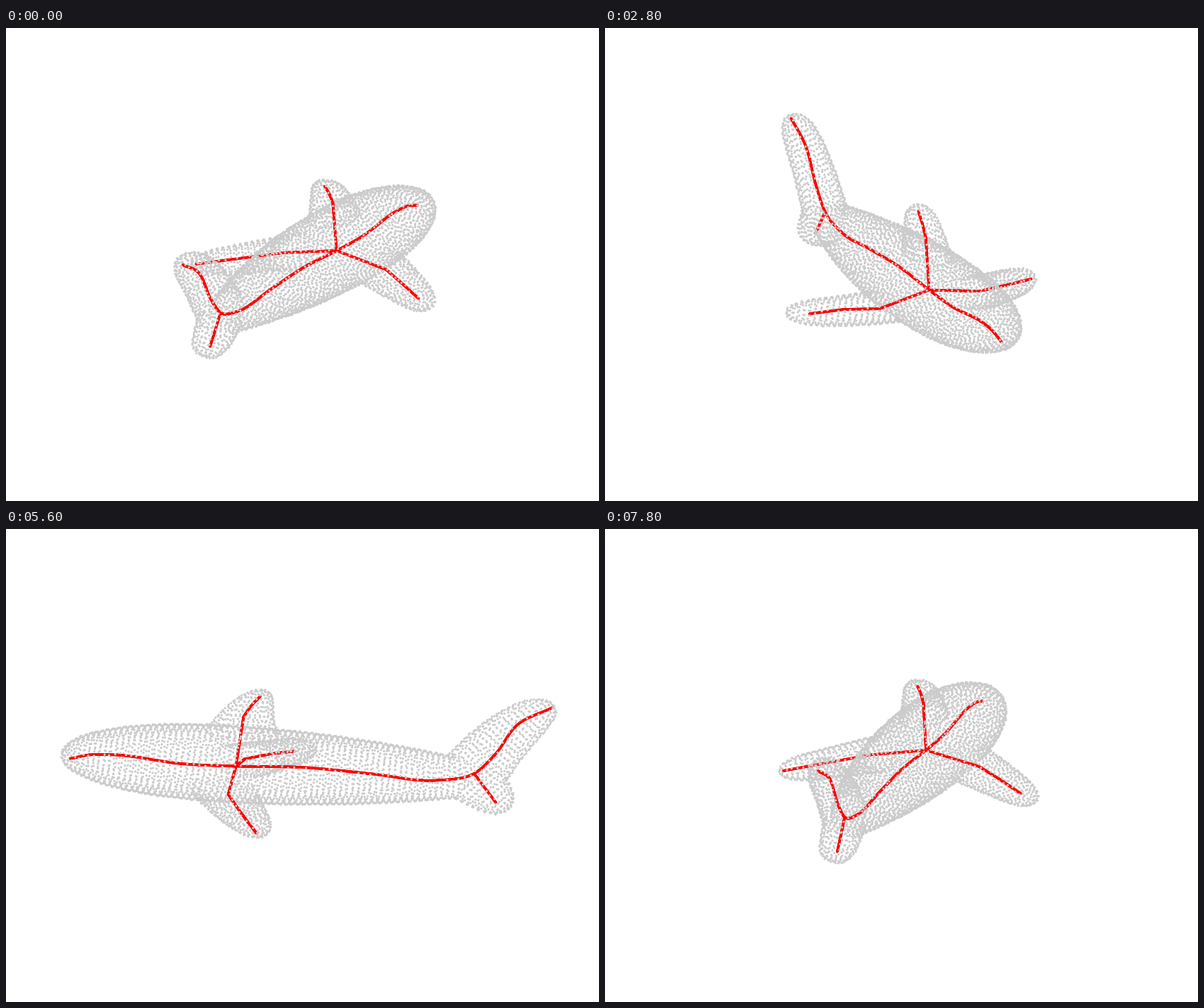
These frames come from a looping animation (837 px wide and 669 px high, 8000 ms). A matplotlib script:

```python
import numpy as np
import matplotlib.pyplot as plt
from matplotlib.animation import FuncAnimation

W, H, DPI = 837, 669, 64
FRAMES, INTERVAL = 40, 200
CX, CY = 418.5, 334.5
PHI = np.radians(61.4)       # heading of the body axis at the start
SIN_E = 0.325                # camera elevation
COS_E = np.sqrt(1 - SIN_E ** 2)
MID = -2.5                   # sideways place of the symmetry plane
GREY, RED = (0.795, 0.795, 0.795, 1), (1, 0, 0, 1)
GREY_PX, RED_PX = 3.2, 3.8
RING, ARC, JITTER = 8.4, 6.9, 0.7
SIDE, UP = (0, 1, 0), (0, 0, 1)
rng = np.random.default_rng(4)

# Coordinates: along the body, sideways, height (as screen y).


def chord(rows):
    return np.r_[0, np.cumsum(np.linalg.norm(np.diff(rows, axis=0), axis=1))]


def resample(rows, step):
    """Even steps along a polyline of any dimension."""
    rows = np.asarray(rows, float)
    dist = chord(rows)
    at = np.linspace(0, dist[-1], max(2, int(round(dist[-1] / step)) + 1))
    return np.column_stack([np.interp(at, dist, c) for c in rows.T])


def smooth(keys):
    """Cubic Hermite curve through key points."""
    keys = np.asarray(keys, float)
    dist = chord(keys)
    slope = np.gradient(keys, dist, axis=0)
    out = []
    for i, h in enumerate(np.diff(dist)):
        t = np.linspace(0, 1, 20)[:, None]
        out.append((1 + 2 * t) * (1 - t) ** 2 * keys[i] + t * (1 - t) ** 2 * h * slope[i]
                   + t * t * (3 - 2 * t) * keys[i + 1] - t * t * (1 - t) * h * slope[i + 1])
    return np.vstack(out)


def flat(*points):
    """Points (x, z) in the symmetry plane."""
    return [(x, MID, z) for x, z in points]


class Tube:
    """Elliptic rings (x, y, z, r1, r2) spanned by two fixed directions."""

    def __init__(self, rows, e1, e2):
        self.e1, self.e2 = (np.array(e, float) / np.linalg.norm(e) for e in (e1, e2))
        self.e3 = np.cross(self.e1, self.e2)
        self.rings = resample(rows, RING)

    def points(self):
        t = np.linspace(0, 2 * np.pi, 200)
        out = []
        for *c, r1, r2 in self.rings:
            arc = chord(np.column_stack([r1 * np.cos(t), r2 * np.sin(t)]))
            n = max(2, int(round(arc[-1] / ARC)))
            a = np.interp((np.arange(n) + rng.random()) / n * arc[-1], arc, t)
            out.append(np.array(c) + np.outer(r1 * np.cos(a), self.e1)
                       + np.outer(r2 * np.sin(a), self.e2))
        pts = np.vstack(out)
        return pts + rng.uniform(-JITTER, JITTER, pts.shape)

    def contains(self, pts):
        along = self.rings[:, :3] @ self.e3
        order = np.argsort(along)
        along, rings = along[order], self.rings[order]
        t = pts @ self.e3
        c = np.column_stack([np.interp(t, along, rings[:, i]) for i in range(3)])
        r1, r2 = (np.interp(t, along, rings[:, i], left=1e-6, right=1e-6)
                  for i in (3, 4))
        d = pts - c
        return (d @ self.e1 / r1) ** 2 + (d @ self.e2 / r2) ** 2 < 0.94


def trunk():
    """Round nose in front of the widest point, parabolic taper behind it."""
    nose, widest, end = 346, 110, -245
    x = widest + (nose - widest) * np.sin(np.linspace(-np.pi / 2, np.pi / 2, 400))
    x = np.r_[np.linspace(end, widest, 200), x[x > widest]]
    front = np.clip((x - widest) / (nose - widest), 0, 1)
    back = np.clip((widest - x) / (widest - end), 0, 1)
    cap = np.sqrt(1 - front ** 2.3)
    high = 1 + cap * (47 - 24 * back ** 2)
    wide = 1 + cap * (74 - 53 * back ** 2)
    rows = np.column_stack([x, 0 * x + MID, 0 * x + 339.5, high, wide])
    return Tube(rows, UP, SIDE)


def fin(base, bend, tip, r1, r2, e1, e2):
    """Quadratic curve with tapering radii and a rounded tip."""
    t = 1 - np.linspace(1, 0, 300)[:, None] ** 2
    axis = ((1 - t) ** 2 * np.array(base) + 2 * t * (1 - t) * np.array(bend)
            + t ** 2 * np.array(tip))
    cap = np.sqrt(1 - t ** 8)
    radii = [1 + cap * (a + (b - a) * t) for a, b in (r1, r2)]
    return Tube(np.hstack([axis, *radii]), e1, e2)


def pectoral(s):
    return fin((105, s * 50, 352), (70, s * 124, 365), (21, s * 190, 370),
               (48, 22), (20, 15), (0.83, s * 0.56, 0), UP)


tubes = [
    trunk(),
    fin(*flat((-245, 335), (-292, 265), (-358, 228)), (44, 23), (27, 23),
        (0.78, 0, -0.62), SIDE),
    fin(*flat((-245, 337), (-266, 358), (-295, 379)), (42, 19), (27, 24),
        (0.77, 0, 0.64), SIDE),
    fin(*flat((88, 292), (82, 262), (59, 233)), (50, 19), (30, 19),
        (1, 0, 0), SIDE),
    pectoral(1), pectoral(-1)]


def skin():
    parts = []
    for tube in tubes:
        pts = tube.points()
        for other in tubes:
            if other is not tube:
                pts = pts[~other.contains(pts)]
        parts.append(pts)
    return np.vstack(parts)


hub, fork = (96, 342), (-246, 332)
spine = flat((334, 345.5), (307, 338.7), (276, 336.5), (170, 343.3), hub,
             (0, 338), (-100, 341.3), (-190, 345), fork, (-275, 304.5),
             (-309, 258.5), (-357.6, 232.5))
limbs = [flat(fork, (-263, 353.5), (-277, 371)),
         flat(hub, (85, 271), (74, 255), (61, 240.8)),
         flat(hub) + [(92, 78, 356), (63, 132, 364), (31, 188, 372)],
         flat(hub) + [(98, -81, 357), (68, -122, 361), (42, -163.5, 369)]]

cloud = skin()
bones = np.vstack([resample(c, 0.8) for c in [smooth(spine), *limbs]])
pts = np.vstack([cloud, bones])
is_bone = np.arange(len(pts)) >= len(cloud)
colors = np.where(is_bone[:, None], RED, GREY)
sizes = (np.where(is_bone, RED_PX, GREY_PX) * 72 / DPI) ** 2


def project(angle):
    """Screen positions and depth towards the viewer."""
    x, y, z = pts.T
    c, s = np.cos(angle), np.sin(angle)
    near = x * s - y * c
    xy = np.column_stack([CX + x * c + y * s, z + SIN_E * near])
    return xy, COS_E * near + SIN_E * (CY - z) / COS_E


fig = plt.figure(figsize=(W / DPI, H / DPI), dpi=DPI, facecolor="white")
ax = fig.add_axes([0, 0, 1, 1])
ax.set(xlim=(0, W), ylim=(H, 0))
ax.axis("off")
dots = ax.scatter(pts[:, 0], pts[:, 1], s=sizes, c=colors, linewidths=0)


def update(i):
    xy, depth = project(2 * np.pi * i / FRAMES - PHI)
    order = np.argsort(depth)
    dots.set_offsets(xy[order])
    dots.set_facecolor(colors[order])
    dots.set_sizes(sizes[order], DPI)
    return dots,


anim = FuncAnimation(fig, update, frames=FRAMES, interval=INTERVAL,
                     repeat=True, repeat_delay=0)
plt.show()
```
